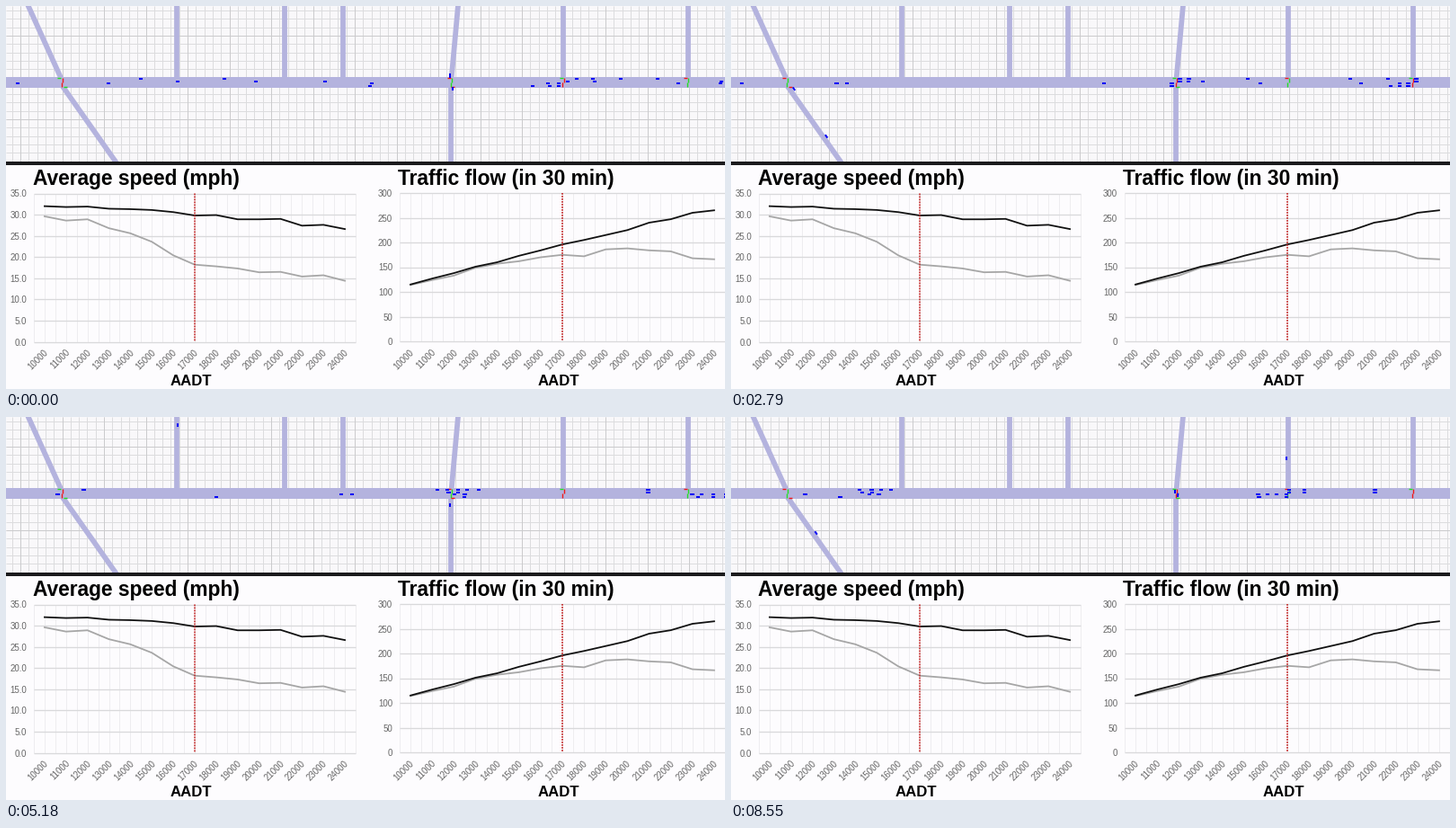
These frames come from a looping animation (800x426 px, 8.58 s). A matplotlib script:

```python
import math
import numpy as np
import matplotlib.pyplot as plt
from matplotlib.animation import FuncAnimation
from matplotlib.collections import LineCollection, PolyCollection
from matplotlib.patches import Rectangle

W, H, DPI = 800, 426, 100
FRAMES, STEP = 286, 30
PX = 72 / DPI

plt.rcParams["font.family"] = "Liberation Sans"
fig = plt.figure(figsize=(W / DPI, H / DPI), dpi=DPI, facecolor="#fdfcfe")
ax = fig.add_axes([0, 0, 1, 1])
ax.set_xlim(0, W)
ax.set_ylim(H, 0)
ax.axis("off")


def lines(segs, color, width, z, snap=None):
    ax.add_collection(LineCollection(segs, colors=color, linewidths=width * PX,
                                     zorder=z, capstyle="butt", snap=snap))


def box(x, y, w, h, color, z):
    ax.add_patch(Rectangle((x, y), w, h, facecolor=color, lw=0, zorder=z))


def label(x, y, s, size, **kw):
    ax.text(x, y, s, fontsize=size * PX, zorder=6, **kw)


# ---------- road map ----------
def draw_map():
    box(0, 0, W, 175, "#f9f8fa", 0)
    cell = 9.3
    xs, ys = np.arange(6.7, W, cell), np.arange(5.1, 174, cell)
    lines([[(x, 0), (x, 174)] for x in xs], "#dcdcde", 1, 0.5)
    lines([[(0, y), (W, y)] for y in ys], "#dcdcde", 1, 0.5)
    lines([[(x, 0), (x, 174)] for x in xs[1::5]], "#cbcbcd", 1, 0.6)
    lines([[(0, y), (W, y)] for y in ys[3::5]], "#cbcbcd", 1, 0.6)
    road = "#b4b3de"
    box(0, 79, W, 11.5, road, 1)
    sides = [[(x, 0), (x, 82)] for x in (189.7, 310, 375, 619.8, 758.8)]
    sides += [[(23, -4), (62, 82)], [(62, 88), (124, 176)],
              [(503.3, -4), (495.5, 82)], [(495, 88), (495, 176)]]
    lines(sides, road, 5.8, 1)
    box(0, 173.4, W, 4, "#1b1b1d", 3)
    box(0, 177, W, H - 177, "#fdfcfe", 3)


# ---------- charts ----------
def draw_chart(title, tx, left, right, base, top, ticks, fmt, lab_x, dark, light, mark):
    n = len(dark)
    gap = (right - left) / n
    xs = left + gap * (np.arange(n) + 0.5)
    scale = (base - top) / ticks[-1]
    lines([[(left + gap * k / 2, top), (left + gap * k / 2, base)]
           for k in range(2 * n + 1)], "#eeedf0", 1, 4)
    lines([[(left, base - v * scale), (right, base - v * scale)] for v in ticks],
          "#d9d9db", 1.3, 4)
    for v in ticks:
        label(lab_x, base - v * scale, fmt % v, 9.8, color="#666666",
              ha="right", va="center_baseline")
    for vals, color in ((light, "#a6a6a6"), (dark, "#111111")):
        ax.plot(xs, base - np.array(vals) * scale, color=color, lw=1.8 * PX, zorder=5)
    lines([[(mark, y), (mark, y + 1.8)] for y in np.arange(top, base, 3)],
          "#c01818", 1.5, 5.5, snap=False)
    for k, x in enumerate(xs):
        label(x + 2.5, 383.5, str(10000 + 1000 * k), 9.8, color="#666666",
              rotation=45, rotation_mode="anchor", ha="right", va="center")
    label(tx, 198.5, title, 22.7, color="black", weight="bold")
    label((left + right) / 2 - 4, 422.5, "AADT", 16.8, color="black",
          weight="bold", ha="center")


draw_map()
draw_chart("Average speed (mph)", 30, 31, 389, 373.5, 208.5, range(0, 36, 5), "%.1f", 23,
           [32, 31.8, 31.9, 31.4, 31.3, 31.1, 30.6, 29.8, 29.9, 28.9, 28.9, 29, 27.4, 27.6, 26.6],
           [29.6, 28.6, 28.9, 26.8, 25.6, 23.6, 20.4, 18.2, 17.8, 17.3, 16.4, 16.5, 15.4, 15.7, 14.4],
           210)
draw_chart("Traffic flow (in 30 min)", 436, 438, 800, 373, 208, range(0, 301, 50), "%d", 430,
           [115, 127, 138, 151, 160, 173, 184, 196, 205, 215, 225, 240, 247, 260, 265],
           [114, 124, 133, 149, 157, 162, 170, 175, 172, 186, 188, 184, 182, 168, 166],
           619)

# ---------- signals: x, main road green at start, switch times, has south arm ----------
SIGNALS = [(62, False, (1.5, 3.3, 6.9), True), (495, True, (.1, 4.5, 8.2), True),
           (619.5, False, (.1, 4, 8.3), False), (758, True, (.9, 4.1, 8.2), False)]
RED, GREEN = "#f01818", "#22e022"


def is_green(signal, t):
    _, start, flips, _ = signal
    return start ^ (sum(t >= f for f in flips) % 2 == 1)


def signal_bars():
    segs = []
    for x, _, _, south in SIGNALS:
        lean = 3 if x < 100 else 0
        segs += [[(x + 1, 80), (x + 1, 85)], [(x - .5, 85), (x - .5, 90)],
                 [(x - 4 - lean / 2, 80), (x - lean / 2, 80)]]
        if south:
            segs.append([(x + lean / 2, 89.5), (x + 4 + lean / 2, 89.5)])
    return segs


def signal_colors(t):
    out = []
    for signal in SIGNALS:
        main, side = (GREEN, RED) if is_green(signal, t) else (RED, GREEN)
        out += [main, main] + [side] * (1 + signal[3])
    return out


# ---------- traffic model ----------
LANES = {"A": (81, -1), "B": (83.8, -1), "C": (86.4, 1), "D": (89.2, 1)}
SPEED, ACCEL, BRAKE, SPACING = 108, 80, 90, 10


def unit(dx, dy):
    r = math.hypot(dx, dy)
    return dx / r, dy / r


N, S = (0, -1), (0, 1)
NW, SE, NE = unit(-38, -80), unit(59, 82), unit(7, -79)


class Car:
    """s is the x along the main road; beyond a turn it runs on along the side road."""

    def __init__(self, lane, s, into, out):
        self.lane, self.s, self.v = lane, s, SPEED
        self.y, self.way = LANES[lane]
        self.into, self.out = into, out

    def past(self, turn):
        return (self.s - turn[0]) * self.way

    def waits_aside(self):
        return self.into and self.past(self.into) < 0

    def on_main(self):
        return not self.waits_aside() and not (self.out and self.past(self.out) > 0)

    def pose(self):
        for turn, sign in ((self.out, 1), (self.into, -1)):
            if turn and self.past(turn) * sign > 0:
                d, (ux, uy) = abs(self.past(turn)), turn[1]
                return turn[0] + ux * d, self.y + uy * d, ux, uy
        return self.s, self.y, 1, 0

    def turns_right(self, x):
        return (self.out and abs(self.out[0] - x) < 5
                and (self.lane, self.out[1][1] > 0) in (("A", False), ("D", True)))

    def red_gaps(self, t):
        """Distances to the stop lines of red signals ahead."""
        for signal in SIGNALS:
            x, green = signal[0], is_green(signal, t)
            if self.waits_aside():
                if green and abs(self.into[0] - x) < 5:
                    edge = self.y - 77 if self.into[1][1] < 0 else 92.5 - self.y
                    yield -self.past(self.into) - edge
            elif not green and not self.turns_right(x):
                yield (x - self.s) * self.way - 4.5

    def safe_speed(self, t, cars):
        if not self.on_main() and not self.waits_aside():
            return SPEED
        top = SPEED
        for gap in self.red_gaps(t):
            can_stop = t == 0 or gap > self.v ** 2 / 400 - 1
            if gap > -1 and can_stop:
                top = min(top, math.sqrt(2 * BRAKE * max(gap, 0)))
        if self.on_main():
            ahead = [((c.s - self.s) * self.way, c.v) for c in cars
                     if c.lane == self.lane and c.on_main()]
            ahead = [a for a in ahead if a[0] > 0]
            if ahead:
                dist, v = min(ahead)
                gap = dist - SPACING
                top = min(top, math.sqrt(max(0, v * v + 2 * BRAKE * gap)))
        return top


fleet = []


def add(lane, *starts, into=None, out=None):
    fleet.extend(Car(lane, s, into, out) for s in starts)


# westbound; starts past the edge arrive later
add("A", 243, 725, 876, 1433, 1531, 1640)
add("B", 191, 278, 655, 796, 1000, 1531, 1640, 1730)
add("A", 150, out=(61, NW))
add("B", 355, out=(64, SE))
add("B", 625, out=(494, S))
add("A", 653, out=(497, NE))
add("A", 684, out=(311, N))
add("A", 635, 1000, out=(621, N))
add("A", 990, 1032, into=(757, N))
add("A", 632, into=(188, N))

# eastbound
add("C", 13, 114, 407, 603, 615, 748, 795, -113, -378, -560, -841)
add("D", 405, 586, 605, 615, -802)
add("C", -289, out=(191, N))
add("D", -72, out=(64, SE))
add("D", -304, -905, into=(66, SE))
add("C", 485, into=(494, N))
add("C", 288, into=(497, S))
add("C", -341, into=(618, N))

# straight across the middle junction
add("D", 494, -205, into=(497, S), out=(497, NE))
add("A", 664, 1193, into=(494, NE), out=(494, S))


def body(x, y, ux, uy, a=2.1, b=1):
    return [(x + p * a * ux - q * b * uy, y + p * a * uy + q * b * ux)
            for p, q in ((-1, -1), (1, -1), (1, 1), (-1, 1))]


def simulate():
    dt = STEP / 1000
    for _ in range(6):  # settle the queues at the start
        for c in fleet:
            c.v = min(c.v, c.safe_speed(0, fleet))
    for i in range(FRAMES):
        yield [body(*c.pose()) for c in fleet]
        for c in fleet:
            c.v = min(c.v + ACCEL * dt, SPEED, c.safe_speed((i + 1) * dt, fleet))
        for c in fleet:
            c.s += c.way * c.v * dt


history = list(simulate())

lights = LineCollection(signal_bars(), linewidths=1.4 * PX, zorder=2, capstyle="butt")
dots = PolyCollection([], facecolors="#0000f5", edgecolors="none", zorder=2.5)
ax.add_collection(lights)
ax.add_collection(dots)


def update(i):
    dots.set_verts(history[i])
    lights.set_color(signal_colors(i * STEP / 1000))
    return dots, lights


anim = FuncAnimation(fig, update, frames=FRAMES, interval=STEP, repeat=True,
                     repeat_delay=0, blit=False)
plt.show()
```
